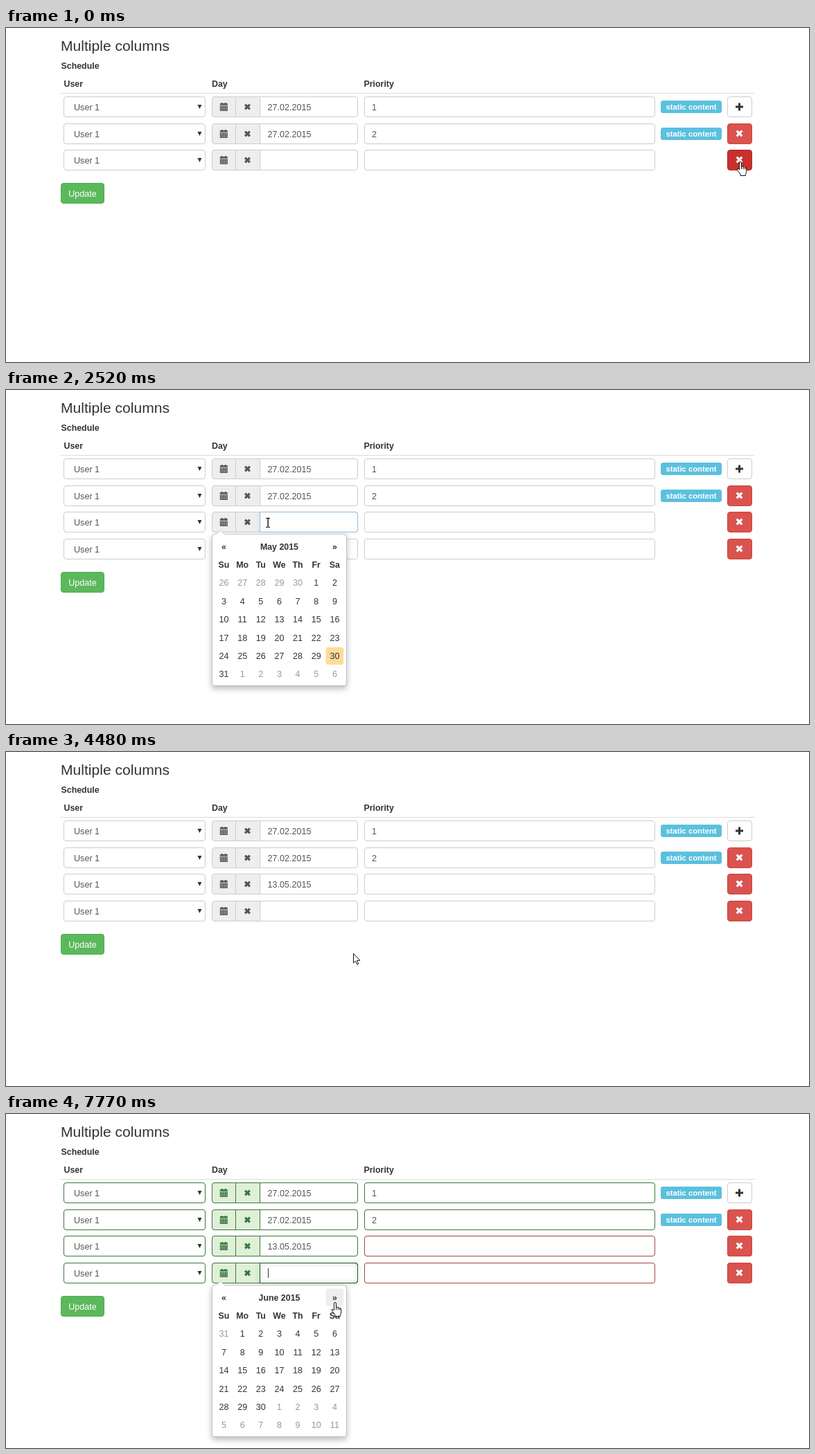
An HTML page with a canvas for the animation above (8000 ms loop, 1159x483 px).

```html
<!DOCTYPE html>
<html lang="en">
<head>
<meta charset="utf-8">
<title>Multiple columns</title>
<style>
html, body { margin: 0; width: 100%; height: 100%; overflow: hidden; background: #fff }
canvas { display: block }
</style>
</head>
<body>
<canvas id="stage" width="1159" height="483"></canvas>
<script>
const ctx = document.getElementById('stage').getContext('2d');
const LOOP = 8000, STEP = 70;
const FAMILY = '"Liberation Sans", Arial, sans-serif';
const REGULAR = '12.6px ' + FAMILY, BOLD = 'bold 12.4px ' + FAMILY;
const clamp = v => Math.max(0, Math.min(1, v));
const swing = p => .5 - Math.cos(clamp(p) * Math.PI) / 2;
const rowTop = i => Math.round(99 + 38.67 * i);

// Pointer path: time, x, y, shape (hand, arrow or ibeam)
const PATH = [
  [0, 1060, 194, 'hand'], [280, 1060, 194, 'hand'], [700, 1061, 119, 'hand'],
  [1680, 1061, 119, 'hand'], [1750, 1022, 128, 'arrow'], [1820, 968, 141, 'arrow'],
  [1890, 925, 147, 'ibeam'], [2450, 378, 192, 'ibeam'], [2870, 378, 192, 'ibeam'],
  [2940, 372, 225, 'hand'], [3150, 379, 324, 'hand'], [3360, 392, 325, 'hand'],
  [3710, 395, 325, 'hand'], [3920, 448, 326, 'hand'], [3990, 498, 322, 'arrow'],
  [4060, 513, 316, 'arrow'], [4130, 501, 291, 'arrow'], [4480, 501, 291, 'arrow'],
  [4900, 49, 296, 'arrow'], [5110, 85, 296, 'arrow'], [5180, 100, 285, 'hand'],
  [5460, 100, 285, 'hand'], [5530, 97, 297, 'arrow'], [5600, 140, 305, 'arrow'],
  [5810, 220, 311, 'arrow'], [6160, 380, 252, 'arrow'], [6230, 391, 232, 'ibeam'],
  [6300, 394, 223, 'ibeam'], [6440, 395, 223, 'ibeam'], [6580, 395, 230, 'ibeam'],
  [7000, 395, 230, 'ibeam'], [7070, 410, 252, 'hand'], [7280, 473, 271, 'hand'],
  [7420, 475, 273, 'hand'], [LOOP, 475, 273, 'hand']
];
const SHAPES = {
  hand: new Path2D('M-1.5 11V1Q-1.5-.5 0-.5Q1.5-.5 1.5 1V6.5Q3 5.3 4.2 7Q5.6 6 6.7 7.8Q9 7.2 8.8 10V13Q8.6 15.8 7.4 17.5V19.5H0V17.5Q-2.5 14.5-4.8 11Q-5 8.6-3 9.5ZM1.5 6.5V10M4.2 7V10.4M6.7 7.8V10.6'),
  arrow: new Path2D('M.5 .5V14L3.6 11.2L5.8 16.3L7.8 15.4L5.7 10.4H9.8Z'),
  ibeam: new Path2D('M-3-6.5H-1Q0-6.5 0-5.5Q0-6.5 1-6.5H3M0-5.5V5.5M-3 6.5H-1Q0 6.5 0 5.5Q0 6.5 1 6.5H3')
};

function box(x, y, w, h, fill, stroke, radius = 3.5) {
  ctx.beginPath();
  ctx.roundRect(x + .5, y + .5, w - 1, h - 1, radius);
  if (fill) { ctx.fillStyle = fill; ctx.fill(); }
  if (stroke) { ctx.strokeStyle = stroke; ctx.stroke(); }
}

function text(str, x, y, color = '#555', font = REGULAR, align = 'left') {
  ctx.font = font;
  ctx.fillStyle = color;
  ctx.textAlign = align;
  ctx.fillText(str, x, y);
}

function line(x1, y1, x2, y2, color, width = 1) {
  ctx.beginPath();
  ctx.moveTo(x1, y1);
  ctx.lineTo(x2, y2);
  ctx.strokeStyle = color;
  ctx.lineWidth = width;
  ctx.stroke();
  ctx.lineWidth = 1;
}

function cross(x, y, color, r = 3.8) {
  line(x - r, y - r, x + r, y + r, color, 3.2);
  line(x - r, y + r, x + r, y - r, color, 3.2);
}

function calendarIcon(x, y, color, paper) {
  ctx.fillStyle = color;
  ctx.fillRect(x - 5.5, y - 5, 11, 11);
  ctx.fillRect(x - 3.5, y - 6, 2, 2);
  ctx.fillRect(x + 1.5, y - 6, 2, 2);
  ctx.fillStyle = paper;
  ctx.fillRect(x - 5.5, y - 2.5, 11, .8);
  for (let k = 0; k < 12; k++) ctx.fillRect(x - 4.3 + k % 4 * 2.4, y - .8 + Math.floor(k / 4) * 2.2, 1.2, 1);
}

function button(y, hot, pressed, isAdd) {
  if (isAdd) box(1041, y, 36, 30, hot ? '#e6e6e6' : '#fff', hot ? '#adadad' : '#ccc');
  else box(1041, y, 36, 30, hot ? '#c9302c' : '#d9534f', hot ? '#ac2925' : '#d43f3a');
  if (pressed) for (let k = 0; k < 4; k++) {
    ctx.fillStyle = `rgba(0,0,0,${.12 - k * .03})`;
    ctx.fillRect(1042, y + 1 + k, 34, 1);
  }
  if (isAdd) {
    line(1053, y + 15, 1064, y + 15, '#333', 3);
    line(1058.5, y + 9.5, 1058.5, y + 20.5, '#333', 3);
  } else cross(1058.5, y + 14.5, '#fff');
}

function drawRow(i, t, alpha, checked) {
  const y = rowTop(i), base = y + 19.5;
  const border = checked ? '#3c763d' : '#ccc', ink = checked ? '#3c763d' : '#555';
  const paper = checked ? '#dff0d8' : '#eee';
  ctx.globalAlpha = alpha;

  box(83, y, 205, 30, '#fff', border);
  text('User 1', 98, base);
  ctx.beginPath();
  ctx.moveTo(276.5, y + 12); ctx.lineTo(282.5, y + 12); ctx.lineTo(279.5, y + 18);
  ctx.fillStyle = '#333';
  ctx.fill();

  box(297, y, 70, 30, paper, border, [3.5, 0, 0, 3.5]);
  line(331.5, y, 331.5, y + 30, border);
  calendarIcon(314.3, y + 15, ink, paper);
  cross(348.5, y + 15, ink, 3.4);
  box(366, y, 142, 30, '#fff', border, [0, 3.5, 3.5, 0]);
  const date = i < 2 ? '27.02.2015' : i === 2 && t >= 3640 ? '13.05.2015' : '';
  text(date, 377.5, base);

  box(517, y, 420, 30, '#fff', checked && i > 1 ? '#a94442' : border);
  if (i < 2) {
    text(i + 1, 528, base);
    box(945, y + 6, 88, 18, '#5bc0de', '#5bc0de', 2.5);
    text('static content', 989, y + 18.5, '#fff', 'bold 11.25px ' + FAMILY, 'center');
  }
  const within = (a, b) => t >= a && t < b;
  button(y, i === 0 ? within(630, 1750) : i === 2 && t < 420,
    i === 0 ? within(910, 1050) || within(1540, 1680) : i === 2 && within(140, 280), i === 0);
  ctx.globalAlpha = 1;
}

function drawFocus(i, t, since, glow, green) {
  const y = rowTop(i);
  ctx.save();
  ctx.globalAlpha = glow;
  ctx.shadowColor = green ? '#67b168' : 'rgba(102,175,233,.7)';
  ctx.shadowBlur = 7;
  box(366, y, 142, 30, null, green ? '#2b542c' : '#66afe9', [0, 3.5, 3.5, 0]);
  ctx.restore();
  const x = i === 2 && t >= 3640 ? 442.5 : 378.5;
  if (glow > .4 && Math.floor((t - since) / 500) % 2 === 0) line(x, y + 8, x, y + 22, '#333');
}

function drawPicker(i, month, picked, pointer) {
  const top = rowTop(i) + 32;
  const colX = c => 314.5 + 26.65 * c, rowY = r => top + 18 + 26.4 * r;
  ctx.save();
  ctx.shadowColor = 'rgba(0,0,0,.25)';
  ctx.shadowBlur = 9;
  ctx.shadowOffsetY = 4;
  box(297, top, 195, 220, '#fff', '#c4c4c4');
  ctx.restore();
  box(297, top, 195, 220, '#fff', '#c4c4c4');
  ctx.beginPath();
  ctx.moveTo(303, top + 1); ctx.lineTo(309.5, top - 5); ctx.lineTo(316, top + 1);
  ctx.fillStyle = '#fff';
  ctx.fill();
  ctx.strokeStyle = '#ccc';
  ctx.stroke();

  const cell = (c, r, fill, span = 1) =>
    box(colX(c) - 13.3, rowY(r) - 13, 26.65 * span, 26.4, fill, null);
  const hc = Math.floor((pointer.x - 301) / 26.65), hr = Math.floor((pointer.y - top - 5) / 26.4);
  const hovering = pointer.shape === 'hand' && hc >= 0 && hc < 7 && hr >= 0 && hr < 8 && hr !== 1;
  if (hovering) hr === 0 && hc > 0 && hc < 6 ? cell(1, 0, '#eee', 5) : cell(hc, hr, '#eee');

  const put = (str, c, r, color, font) => text(str, colX(c), rowY(r) + 4.5, color, font, 'center');
  put('«', 0, 0, '#333', BOLD);
  put((month === 4 ? 'May' : 'June') + ' 2015', 3, 0, '#333', BOLD);
  put('»', 6, 0, '#333', BOLD);
  ['Su', 'Mo', 'Tu', 'We', 'Th', 'Fr', 'Sa'].forEach((d, c) => put(d, c, 1, '#333', BOLD));
  const offset = new Date(2015, month, 1).getDay();
  for (let k = 0; k < 42; k++) {
    const date = new Date(2015, month, 1 - offset + k), day = date.getDate();
    const c = k % 7, r = 2 + Math.floor(k / 7), current = date.getMonth() === month;
    const active = picked && current && day === 13;
    if (current && month === 4 && day === 30) cell(c, r, '#ffdb99');
    if (active) cell(c, r, '#428bca');
    put(day, c, r, active ? '#fff' : current ? '#333' : '#999');
  }
}

function drawUpdate(rows, t) {
  const y = rowTop(rows - 1) + 48, hot = t >= 5180 && t < 6860;
  box(79, y, 63, 30, hot ? '#449d44' : '#5cb85c', hot ? '#398439' : '#4cae4c');
  if (t >= 5320 && hot) {
    ctx.lineWidth = 2;
    box(79, y, 63, 30, null, '#6da5d8', 2.5);
    ctx.lineWidth = 1;
  }
  text('Update', 110.5, y + 19.5, '#fff', REGULAR, 'center');
}

function pointerAt(t) {
  const n = PATH.findIndex(key => key[0] > t);
  const a = PATH[n - 1], b = PATH[n], p = (t - a[0]) / (b[0] - a[0]);
  return { x: a[1] + (b[1] - a[1]) * p, y: a[2] + (b[2] - a[2]) * p, shape: a[3] };
}

function drawPointer({ x, y, shape }) {
  ctx.save();
  ctx.translate(Math.round(x), Math.round(y));
  if (shape !== 'ibeam') {
    ctx.fillStyle = '#fff';
    ctx.fill(SHAPES[shape]);
  }
  ctx.strokeStyle = '#111';
  ctx.stroke(SHAPES[shape]);
  ctx.restore();
}

function draw(t) {
  ctx.fillStyle = '#fff';
  ctx.fillRect(0, 0, 1159, 483);
  text('Multiple columns', 79, 33, '#333', '21.1px ' + FAMILY);
  text('Schedule', 79.5, 59, '#333', BOLD);
  text('User', 83.5, 85, '#333', BOLD);
  text('Day', 297, 85, '#333', BOLD);
  text('Priority', 516.5, 85, '#333', BOLD);
  line(79, 94.5, 1081, 94.5, '#ddd');

  const rows = t < 630 ? 3 : t < 1050 ? 2 : t < 1680 ? 3 : 4;
  const third = t < 630 ? 1 - swing((t - 280) / 300) : swing((t - 1035) / 300);
  const alphas = [1, 1, third, swing((t - 1650) / 300)];
  const checked = clamp((t - 5400) / 150);
  for (let i = 0; i < rows; i++) {
    drawRow(i, t, alphas[i], false);
    if (t >= 5460) drawRow(i, t, checked, true);
  }
  drawUpdate(rows, t);

  const pointer = pointerAt(t);
  if (t >= 2520 && t < 4480) {
    const since = t < 3640 ? 2520 : 3640;
    const glow = t < 4340 ? clamp((t - since + 70) / 150) : clamp(1 - (t - 4270) / 150);
    drawFocus(2, t, since, glow, false);
    if (t < 4340) drawPicker(2, 4, t >= 3640, pointer);
  } else if (t >= 6860) {
    const since = t < 7560 ? 6860 : 7560;
    drawFocus(3, t, since, clamp((t - since + 70) / 150), true);
    drawPicker(3, t < 7560 ? 4 : 5, false, pointer);
  }
  drawPointer(pointer);
}

function tick(now) {
  draw(Math.floor(now % LOOP / STEP) * STEP);
  requestAnimationFrame(tick);
}
requestAnimationFrame(tick);
</script>
</body>
</html>
```
